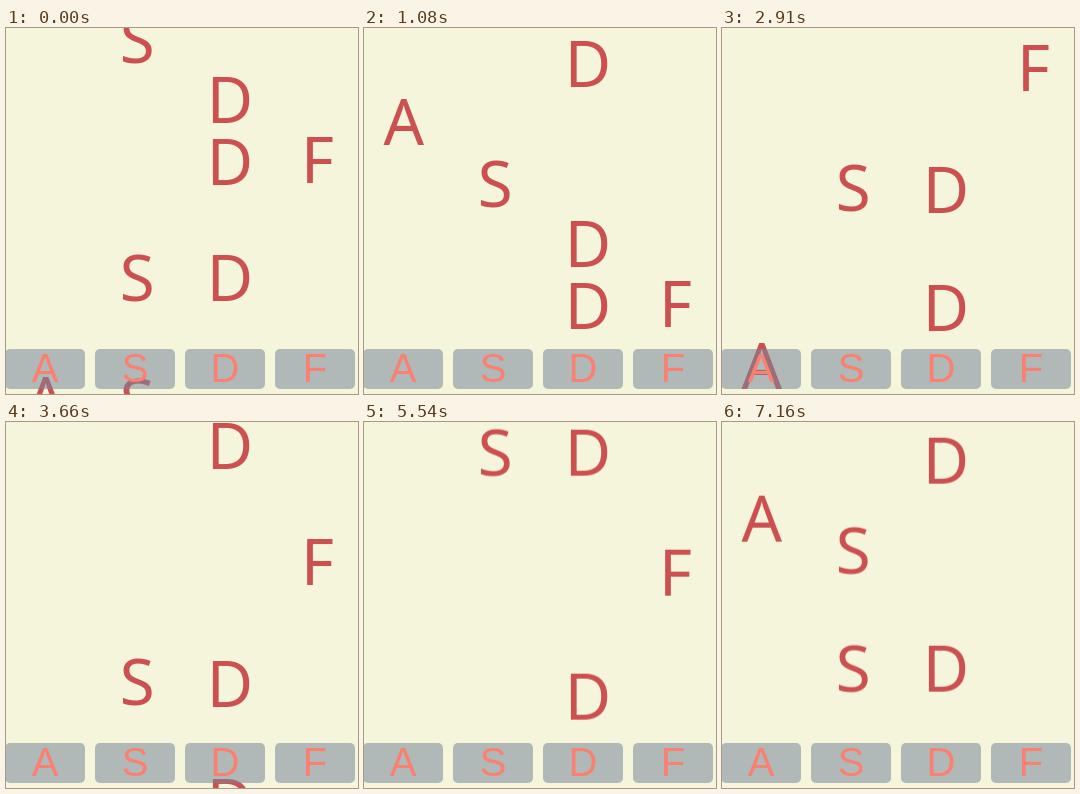
Write an HTML page that moves like this. It is 352 px wide and 366 px high and loops after 7.19 s.

```html
<!DOCTYPE html>
<html lang="en">
<head>
<meta charset="utf-8">
<title>Falling letters</title>
<style>
  html, body { margin: 0; width: 100%; height: 100%; overflow: hidden; background: #f5f5dc; }
  svg { display: block; width: 352px; height: 366px; overflow: hidden; }

  #rain {
    font: 63.5px "Noto Sans", "Open Sans", sans-serif;
    fill: #cd5050;
    animation: fall 7190ms linear infinite;
  }
  #keys text {
    font: 40px "Liberation Sans", Arial, sans-serif;
    fill: #fa8072;
    text-anchor: middle;
  }
  #keys rect { fill: rgba(119, 136, 153, .55); }

  /* 133.33 px per second over the whole loop */
  @keyframes fall { to { transform: translateY(958.67px); } }

  .hit1, .hit2, .hit3, .pressS, .pressD, .pressF {
    animation: 7190ms step-end infinite;
  }
  .hit1 { animation-name: hit1; }
  .hit2 { animation-name: hit2; }
  .hit3 { animation-name: hit3; }
  @keyframes hit1 { 0% { visibility: visible; } 59.67%, 100% { visibility: hidden; } }
  @keyframes hit2 { 0% { visibility: visible; } 72.46%, 100% { visibility: hidden; } }
  @keyframes hit3 { 0% { visibility: visible; } 96.94%, 100% { visibility: hidden; } }

  #keys .pressS, #keys .pressD { animation-name: pressMid; }
  #keys .pressF { animation-name: pressLate; }
  @keyframes pressMid {
    59.5% { fill: rgba(119, 136, 153, .65); }
    60.9% { fill: rgba(119, 136, 153, .55); }
  }
  @keyframes pressLate {
    72.3%, 96.8% { fill: rgba(119, 136, 153, .65); }
    73.7%, 98.5% { fill: rgba(119, 136, 153, .55); }
  }
</style>
</head>
<body>
<svg viewBox="0 0 352 366">
  <g id="rain"></g>
  <g id="keys"></g>
</svg>
<script>
  const add = (parent, tag, attrs, text = '') => {
    const el = document.createElementNS('http://www.w3.org/2000/svg', tag);
    for (const name in attrs) el.setAttribute(name, attrs[name]);
    el.textContent = text;
    document.getElementById(parent).append(el);
  };

  const column = { A: 19.5, S: 113.7, D: 200.8, F: 295 };

  // letter, baseline at the start of the loop, moment it is struck
  const notes = [
    ['A', 394], ['S', 396], ['S', 272], ['D', 272], ['D', 156], ['F', 154],
    ['D', 94], ['S', 34], ['A', -28], ['D', -86],
    ['S', -206, 'hit1'], ['D', -204, 'hit1'], ['F', -326, 'hit2'],
    ['D', -442], ['F', -566, 'hit3'], ['S', -686], ['D', -686],
    ['S', -804], ['A', -836], ['D', -894]
  ];
  for (const [letter, y, hit = ''] of notes) {
    add('rain', 'text', { x: column[letter], y: y + 0.4, class: hit }, letter);
  }

  [...'ASDF'].forEach((letter, i) => {
    const x = 90 * i - 1;
    add('keys', 'rect', { x, y: 321, width: 80, height: 40, rx: 5, class: 'press' + letter });
    add('keys', 'text', { x: x + 40, y: 354 }, letter);
  });
</script>
</body>
</html>
```
